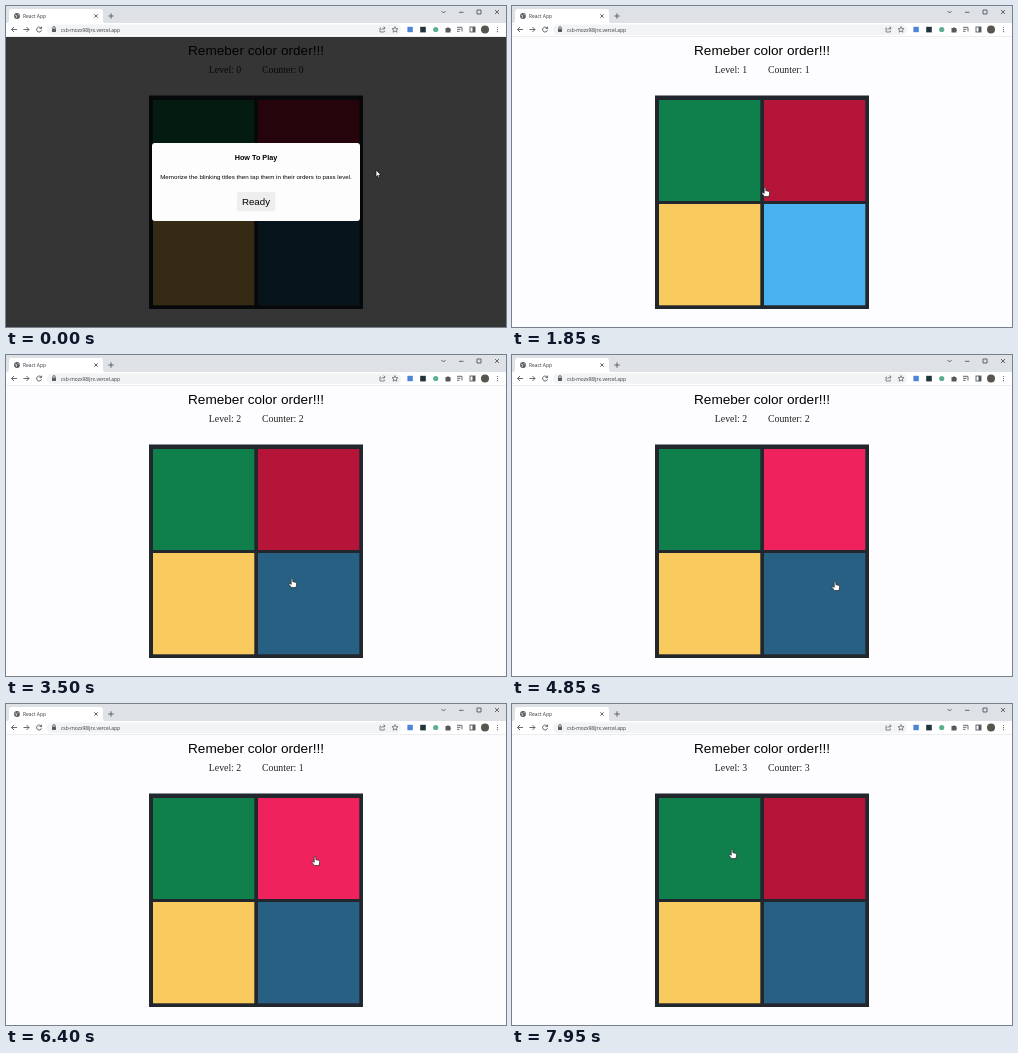
These frames come from a looping animation (500x321 px, 8 s). An HTML page:

```html
<!DOCTYPE html>
<html lang="en">
<head>
<meta charset="utf-8">
<title>Color order game</title>
<style>
  html, body { margin: 0; width: 100%; height: 100%; overflow: hidden; background: #fdfcfe; }
  svg { display: block; width: 100vw; height: 100vh; }
  .ui { font: 4.9px "Open Sans", "Noto Sans", sans-serif; fill: #35383c; }
  .sans { font-family: "Liberation Sans", Arial, sans-serif; text-anchor: middle; }
  .serif { font: 9.8px "Liberation Serif", "Times New Roman", serif; fill: #222; }
  .line { fill: none; stroke: #55595e; stroke-width: .9; }
</style>
</head>
<body>
<svg viewBox="0 0 500 321">
  <!-- Browser window -->
  <rect width="500" height="17" fill="#dee1e6"/>
  <path d="M1 17Q3 17 3 15V6Q3 3 6 3H94Q97 3 97 6V15Q97 17 99 17Z" fill="#fff"/>
  <rect y="17" width="500" height="14" fill="#fff"/>
  <rect y="30.3" width="500" height=".7" fill="#e3e5e8"/>
  <rect x="41" y="18.5" width="354" height="10.5" rx="5.2" fill="#f1f3f4"/>
  <circle cx="11" cy="10" r="2.9" fill="#55595e"/>
  <path d="M9 9L11 10L10 12M11.5 8L13 9.5" class="line" style="stroke:#fff;stroke-width:.7"/>
  <text class="ui" x="17" y="12">React App</text>
  <text class="ui" x="55" y="25.6">csb-mozx98ljrx.vercel.app</text>
  <g class="line">
    <path d="M88.3 8.3L91.7 11.7M91.7 8.3L88.3 11.7M102.3 10H107.7M105 7.3V12.7"/>
    <path d="M435.5 5L437.5 7L439.5 5M453 6.3H457.5M471 4H475V8H471ZM489 4L493 8M493 4L489 8"/>
    <path d="M11 23.5H5.5M8 21L5.5 23.5L8 26M17.5 23.5H23M20.5 21L23 23.5L20.5 26"/>
    <path d="M35.2 22.2A2.5 2.5 0 1 0 35.5 24.2M35.6 20.6V22.6H33.5"/>
    <path d="M46.8 23V21.8A1.2 1.2 0 0 1 49.2 21.8V23"/>
    <path d="M375 22H374V26H378.3V24.5M375.5 24Q376 22 379 22M377.6 20.5L379.2 22L377.6 23.5" stroke-width=".7"/>
    <path d="M389 20.6L389.8 22.6L392 22.7L390.3 24.1L390.9 26.2L389 25L387.1 26.2L387.7 24.1L386 22.7L388.2 22.6Z" stroke-width=".7"/>
    <path d="M451 21.3H456M451 23.3H454.5M451 25.3H453.5M456 21.5V25.5"/>
    <rect x="464" y="21" width="5" height="5"/>
  </g>
  <rect x="46" y="22.8" width="4" height="3.2" rx=".4" fill="#55595e"/>
  <rect x="401.4" y="20.8" width="5.4" height="5.4" fill="#4c83d9"/>
  <rect x="414.2" y="20.8" width="5.6" height="5.6" fill="#21343b"/>
  <circle cx="429.7" cy="23.5" r="2.6" fill="#5aae91"/>
  <path d="M439.5 22H441A1.1 1.1 0 0 1 443 22H444.4V23.4A1 1 0 0 1 444.4 25.2V26.4H439.5Z" fill="#55595e"/>
  <rect x="466.5" y="21" width="2.5" height="5" fill="#55595e"/>
  <circle cx="479" cy="23.5" r="4" fill="#56564f"/>
  <g fill="#55595e"><circle cx="491.5" cy="21.5" r=".6"/><circle cx="491.5" cy="23.6" r=".6"/><circle cx="491.5" cy="25.7" r=".6"/></g>

  <!-- Game -->
  <text class="sans" x="250" y="49.3" font-size="13.6">Remeber color order!!!</text>
  <text class="serif" id="level" x="202.8" y="67.4"></text>
  <text class="serif" id="counter" x="256" y="67.4"></text>
  <rect x="143" y="89.5" width="214" height="213.5" fill="#22272e"/>
  <rect x="147" y="94" width="101.3" height="101" fill="#0f7f4c"/>
  <rect id="red" x="252" y="94" width="101.3" height="101"/>
  <rect x="147" y="198" width="101.3" height="101.3" fill="#f9ca5e"/>
  <rect id="blue" x="252" y="198" width="101.3" height="101.3"/>

  <g id="dialog">
    <rect y="31" width="500" height="290" opacity=".79"/>
    <rect x="146" y="137" width="208" height="78" rx="3" fill="#fefdfe"/>
    <text class="sans" x="250" y="153.5" font-size="7.25" font-weight="bold">How To Play</text>
    <text class="sans" x="250" y="172.7" font-size="6.2">Memorize the blinking titles then tap them in their orders to pass level.</text>
    <rect x="231" y="186" width="38.5" height="19.3" rx="2" fill="#eeeeef"/>
    <text class="sans" x="250" y="199.2" font-size="9.7">Ready</text>
  </g>

  <g id="cursor" stroke-linejoin="round">
    <path id="arrow" d="M0 0V7L1.6 5.5L2.6 8L3.8 7.5L2.8 5.1H5Z" fill="#fff" stroke="#111" stroke-width=".7"/>
    <path id="hand" d="M-.8 .8Q0 -.4 .8 .8V3.6L4 4.4Q4.9 4.7 4.7 6L4 9.6H-.6L-3 6.4Q-3 5 -1.8 5.6L-.8 6.4Z" fill="#fff" stroke="#222" stroke-width=".7"/>
  </g>
</svg>
<script>
const LOOP = 8000;
const START = 750, LEVEL_2 = 2750, FIRST_TAP = 6250, LEVEL_3 = 6880;
const $ = id => document.getElementById(id);

// Times at which a tile lights up, by blinking or by a tap
const tiles = {
  red: { base: [182, 21, 58], lit: [239, 34, 93], flashes: [3650, 4650, FIRST_TAP, LEVEL_3] },
  blue: { base: [40, 96, 131], lit: [75, 178, 242], flashes: [1650, LEVEL_2] }
};

// Pointer tip: time, x, y
const path = [
  [0, 370, 164], [150, 370, 164], [600, 252, 197], [950, 250, 196],
  [1500, 253, 181], [1900, 253, 181], [2500, 277, 240], [2950, 277, 240],
  [3400, 286, 223], [3900, 286, 223], [4600, 323, 226], [4900, 323, 226],
  [5150, 334, 208], [5500, 413, 190], [5700, 413, 188], [6150, 309, 152],
  [7000, 309, 152], [7700, 220, 145], [LOOP, 220, 145]
];

const clamp = v => Math.max(0, Math.min(1, v));
const ease = v => v * v * (3 - 2 * v);
const mix = (a, b, v) => a + (b - a) * v;

// Quick rise, short hold, softer fall
const glow = age => Math.min(clamp(age / 100), clamp((500 - age) / 150));

function pointerAt(t) {
  const i = path.findIndex(p => p[0] > t);
  const [t0, x0, y0] = path[i - 1], [t1, x1, y1] = path[i];
  const v = ease((t - t0) / (t1 - t0));
  return [mix(x0, x1, v), mix(y0, y1, v)];
}

function draw(t) {
  const level = t < START ? 0 : t < LEVEL_2 ? 1 : t < LEVEL_3 ? 2 : 3;
  const tapped = t >= FIRST_TAP && t < LEVEL_3;
  $("level").textContent = `Level: ${level}`;
  $("counter").textContent = `Counter: ${tapped ? 1 : level}`;
  $("dialog").style.display = level ? "none" : "";

  for (const [id, { base, lit, flashes }] of Object.entries(tiles)) {
    const light = Math.max(...flashes.map(at => glow(t - at)));
    $(id).setAttribute("fill", `rgb(${base.map((c, i) => mix(c, lit[i], light))})`);
  }

  const [x, y] = pointerAt(t);
  const onButton = x > 231 && x < 269 && y > 186 && y < 205;
  const onBoard = x > 143 && x < 357 && y > 90 && y < 303;
  const pointing = level ? onBoard : onButton;
  $("cursor").setAttribute("transform", `translate(${x} ${y})`);
  $("hand").style.display = pointing ? "" : "none";
  $("arrow").style.display = pointing ? "none" : "";
}

const began = performance.now();
function frame() {
  draw((performance.now() - began) % LOOP);
  requestAnimationFrame(frame);
}
frame();
</script>
</body>
</html>
```
